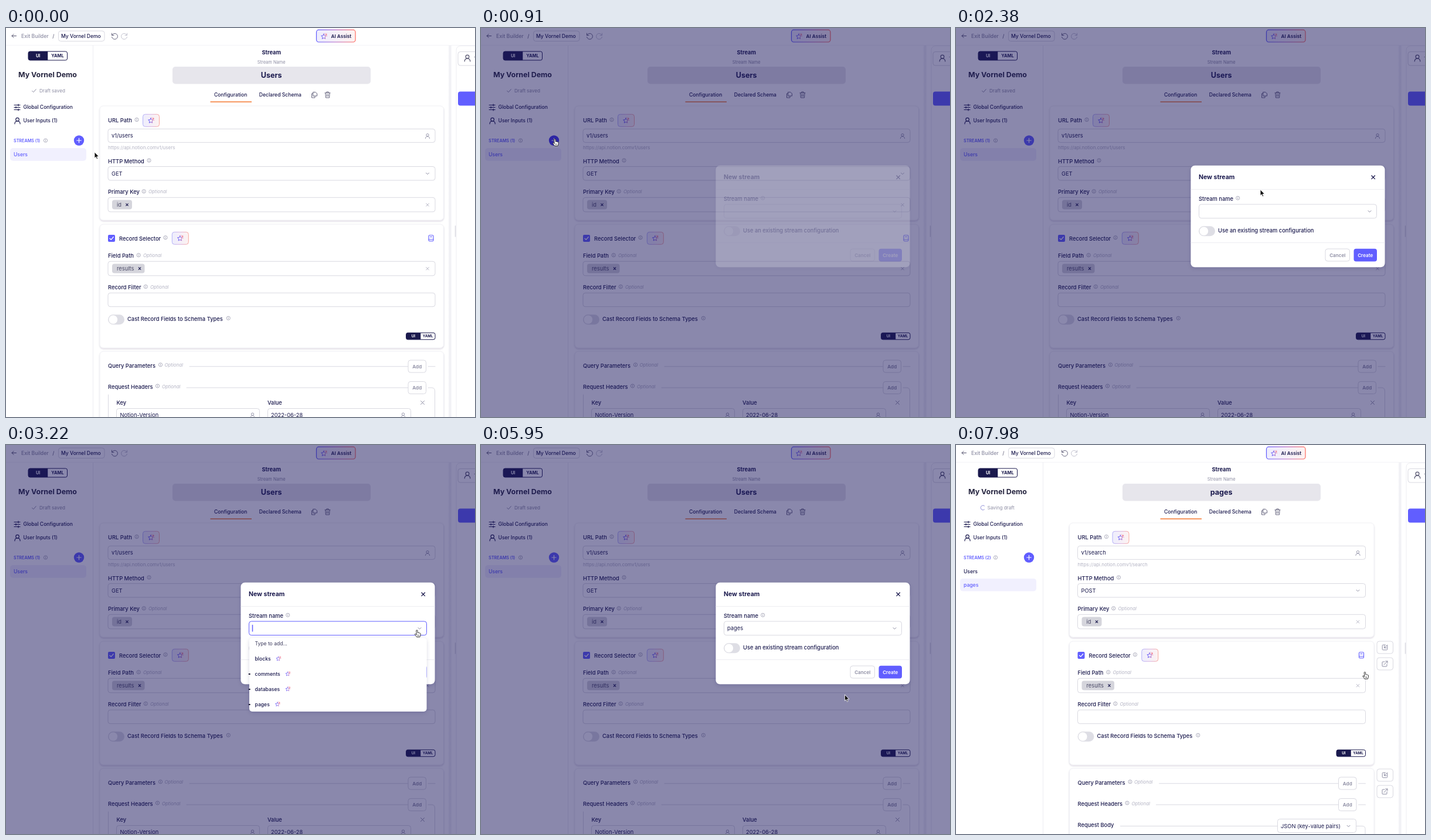
Animation of 800 by 664 pixels, one loop 8000 ms. Source, as an HTML page:

```html
<!DOCTYPE html>
<html lang="en">
<head>
<meta charset="utf-8">
<title>New stream dialog</title>
<style>
  html, body { margin: 0; width: 100%; height: 100%; overflow: hidden; background: #fff; }
  svg { display: block; width: 100vw; height: 100vh; font-family: Inter, sans-serif; }
  text { white-space: pre; }
</style>
</head>
<body>
<svg id="stage" viewBox="0 0 800 664" preserveAspectRatio="xMinYMin meet"></svg>
<script>
const INK = '#1a194d', DARK = '#25243f', GREY = '#8d8da3', PALE = '#b4b4c4';
const EDGE = '#d9d9e1', VIOLET = '#615eff', DEEP = '#4035f0', FAINT = '#ededf2';

// Drawing helpers; text is placed by the middle of its capitals.
const text = (x, y, s, size = 9.3, fill = INK, weight = 400, more = '') =>
  `<text x="${x}" y="${y + size * .364}" font-size="${size}" fill="${fill}" font-weight="${weight}" ${more}>${s}</text>`;
const mid = 'text-anchor="middle"';
const box = (x, y, w, h, r = 4, fill = '#fff', stroke = EDGE, more = '') =>
  `<rect x="${x}" y="${y}" width="${w}" height="${h}" rx="${r}" fill="${fill}" stroke="${stroke}" ${more}/>`;
const path = (d, stroke = GREY, width = 1, fill = 'none') =>
  `<path d="${d}" fill="${fill}" stroke="${stroke}" stroke-width="${width}" stroke-linecap="round" stroke-linejoin="round"/>`;
const at = (x, y, s) => `<g transform="translate(${x} ${y})">${s}</g>`;
const group = (id, s) => `<g id="${id}">${s}</g>`;

const label = (x, y, s) => text(x, y, s, 9.33, INK, 500);
const info = (x, y) => at(x, y,
  `<circle r="3.1" fill="none" stroke="${GREY}" stroke-width=".7"/>` + path('M0-.3V1.4M0-1.5v.1', GREY, .7));
const optional = (x, y) => text(x, y, 'Optional', 7.9, PALE, 400, 'font-style="italic"');
const cross = (x, y, r = 2.3, c = GREY, w = 1) => path(`M${x - r} ${y - r}l${2 * r} ${2 * r}m0 ${-2 * r}l${-2 * r} ${2 * r}`, c, w);
const chevron = (x, y) => path(`M${x - 2.5} ${y - 1.2}l2.5 2.5l2.5-2.5`);
const person = (x, y, k = 1, c = GREY) => at(x, y,
  path(`M${-4 * k} ${4.5 * k}c0-${5.4 * k} ${8 * k}-${5.4 * k} ${8 * k} 0`, c, k) +
  `<circle cy="${-2 * k}" r="${2.4 * k}" fill="none" stroke="${c}" stroke-width="${k}"/>`);

const starPath = 'M' + Array.from({ length: 10 }, (_, i) => {
  const r = i % 2 ? 2.2 : 4.6, a = i * Math.PI / 5 - Math.PI / 2;
  return `${(r * Math.cos(a)).toFixed(2)} ${(r * Math.sin(a)).toFixed(2)}`;
}).join('L') + 'Z';
const star = (x, y, k = 1) => at(x, y, `<g transform="scale(${k})">` + path(starPath, 'url(#cool)') +
  path('M4.2-4.9v2.4M3-3.7h2.4M5.7-1v.1M1.8-5.3v.1', '#f0667a', .8) + '</g>');
const aiButton = (x, y) => box(x, y, 28, 21, 4, 'url(#tint)', 'url(#blush)') + star(x + 13.5, y + 11);

const button = (x, y, w, s) => box(x, y, w, 21, 4) + text(x + w / 2, y + 10.7, s, 8.1, GREY, 600, mid);
const toggle = (x, y) => box(x, y, 28, 17, 8.5, '#dedee5', 'none') +
  `<circle cx="${x + 8.8}" cy="${y + 8.5}" r="7.8" fill="#fff" stroke="#d3d3dc" stroke-width=".6"/>`;
const modes = (x, y, w, h, size) => box(x, y, w, h, 3, '#fff', INK) +
  `<path d="M${x + w / 2} ${y}h${3 - w / 2}q-3 0-3 3v${h - 6}q0 3 3 3h${w / 2 - 3}z" fill="${INK}"/>` +
  text(x + w / 4, y + h / 2, 'UI', size, '#fff', 700, mid) +
  text(x + w * .75, y + h / 2, 'YAML', size, INK, 700, mid);
const chip = (x, y, w, s) => box(x, y, w, 16, 4, '#d5d5dc', 'none') +
  text(x + 8, y + 8, s, 9.3, '#4a4966') + cross(x + w - 8.5, y + 8, 1.8, INK, 1.1);
const card = (x, y, w, h) => box(x, y, w, h, 6, '#fff', '#f0f0f5', 'filter="url(#soft)"');

function form(L, R, path_, method) {
  const w = R - L;
  const line = (a, b, y) => path(`M${a} ${y}H${b}`, EDGE);
  return [
    card(L - 14, 133, w + 28.5, 195), card(L - 14, 335, w + 28.5, 211), card(L - 14, 552, w + 28.5, 140),
    label(L, 158, 'URL Path'), info(L + 49, 156.5), aiButton(L + 59.5, 147.3),
    box(L, 172.3, w, 23), text(L + 6, 184, path_), person(R - 13, 184.5, .9),
    text(L, 204, 'https://api.notion.com' + path_, 8, PALE),
    label(L, 227.5, 'HTTP Method'), info(L + 70, 226),
    box(L, 236.5, w, 23.5), text(L + 6, 248.3, method), chevron(R - 13, 248.5),
    label(L, 280, 'Primary Key'), info(L + 61.2, 278.8), optional(L + 69, 279.6),
    box(L, 289.3, w, 24.5), chip(L + 7, 293.6, 34, 'id'), cross(R - 13, 301.8, 2.3, PALE),

    box(L, 353, 12, 12, 2, VIOLET, 'none'), path(`M${L + 3} 359.2l2.2 2.2l4-4.6`, '#fff', 1.3),
    label(L + 19, 359.2, 'Record Selector'), info(L + 98, 357.7), aiButton(L + 109.3, 348.3),
    at(R - 7, 358.7, box(-4, -5, 8, 10, 1.5, 'none', VIOLET, 'stroke-width="1.1"') + path('M-4 2.2h8M-1.5-2.2h3', VIOLET)),
    label(L, 389, 'Field Path'), info(L + 52.2, 387.7), optional(L + 60, 388.6),
    box(L, 398.3, w, 24.5), chip(L + 7, 402.5, 55.5, 'results'), cross(R - 13, 410.7, 2.3, PALE),
    label(L, 443, 'Record Filter'), info(L + 64.3, 441.5), optional(L + 72, 442.4),
    box(L, 452.2, w, 23.5),
    toggle(L, 489.2), label(L + 33, 497, 'Cast Record Fields to Schema Types'), info(L + 205.3, 495.3),
    modes(R - 49.5, 520.3, 49.5, 11.5, 6.1),

    label(L, 576.2, 'Query Parameters'), info(L + 89.5, 574.8), optional(L + 96.5, 575.6),
    line(L + 139, R - 46, 577.8), line(R - 12, R, 577.8), button(R - 46, 567, 30.5, 'Add'),
    label(L, 612.6, 'Request Headers'), info(L + 84.5, 611), optional(L + 92, 611.9),
    line(L + 134, R - 46, 614), button(R - 46, 603.5, 30.5, 'Add')
  ].join('');
}

const headers = () => path('M720 614h6q5.5 0 5.5 6v50M174.5 670v-44', EDGE) +
  label(188.5, 640, 'Key') + label(446, 640, 'Value') + cross(710.5, 639.5, 3) +
  box(188.5, 649.5, 244, 24) + text(194.5, 661, 'Notion-Version') + person(420.5, 661, .9) +
  box(446.5, 649.5, 244, 24) + text(452, 661, '2022-06-28') + person(677.5, 661, .9);

const importIcon = path('M1-4.3h-4q-1.3 0-1.3 1.3v6q0 1.3 1.3 1.3h6q1.3 0 1.3-1.3v-6M4.3-4.3l-5 5M-.8-2.7v3.5h3.5', GREY);
const exportIcon = path('M-.5-3.5h-3q-1 0-1 1v6q0 1 1 1h6q1 0 1-1v-3M-1.5 1.5l6-6M1.2-4.5h3.3v3.3', GREY);
const sideButton = (y, icon) => box(718, y, 27.5, 21, 4) + at(731.5, y + 10.5, icon);

const body = () => label(207.5, 649, 'Request Body') +
  path('M686.5 614h12M280.5 650.5H548M683 650.5h10q5 0 5 5v12', EDGE) +
  box(548.5, 638.5, 134, 23) + text(554, 650.2, 'JSON (key-value pairs)') + chevron(669.5, 650.5) +
  [335, 553].map(y => sideButton(y, importIcon) + sideButton(y + 28, exportIcon)).join('');

const shell = () => [
  path('M0 29.5H800', '#f3f3f7'), path('M148.5 30V664', FAINT),
  `<rect x="754" y="30" width="6" height="634" fill="url(#gutter)"/>`,
  path('M800 30.5H776q-8 0-8 8V664', FAINT), path('M766.5 338v18', EDGE, 1.5),
  path('M17.5 13.5h-7.5m3-3l-3 3l3 3', '#55546f'), text(26, 13.8, 'Exit Builder', 8.7, GREY, 500),
  text(79.3, 13.8, '/', 8.7, '#55546f'), box(89.5, 5, 78.5, 17.5), text(94, 13.9, 'My Vornel Demo', 8.55, INK, 500),
  path('M180.5 9v3.5h3.5M180.8 12.3a5 5 0 1 1-.3 3', '#66657e'),
  path('M206.5 9v3.5h-3.5M206.2 12.3a5 5 0 1 0 .3 3', '#c3c3d0'),
  box(529.5, 3.2, 66.5, 20.8, 4, 'url(#tint)', 'url(#warm)', 'stroke-width="1.2"'), star(542, 14.7), text(554.5, 13.7, 'AI Assist', 8.2, INK, 600),
  modes(38, 40, 66.5, 15, 7.4), text(71, 79.2, 'My Vornel Demo', 12.4, DARK, 700, mid),
  path('M14 131.5h10M14 135.5h10M14 139.5h10M21 130v3M17 134v3M21 138v3', INK, 1.2), text(29.5, 135.3, 'Global Configuration', 8.55, INK, 500),
  person(19.5, 158.5, 1.15, INK), text(29.5, 158.2, 'User Inputs (1)', 8.45, INK, 500),
  info(67.5, 192), `<circle id="plus" cx="124.5" cy="192" r="8.7" fill="${VIOLET}"/>`, path('M120.8 192h7.4m-3.7-3.7v7.4', '#fff', 1.2),
  text(452.7, 41.3, 'Stream', 9.3, INK, 700, mid), text(452.7, 58, 'Stream Name', 7.45, GREY, 400, mid),
  box(284, 66, 338, 29.5, 5, '#e7e6ec', 'none'),
  text(355, 113.6, 'Configuration', 8.65, INK, 500), text(431.7, 113.6, 'Declared Schema', 8.6, INK, 500),
  `<rect x="348.5" y="125.3" width="70.5" height="1.6" fill="#f5803e"/>`,
  at(526, 114.3, path('M-2-4.8h4l2.5 2.5v4h-6.5zM-2-2.3h-2.5v7h5.5v-2.5', '#66657e')),
  at(548.5, 114, path('M-4.5-3.2h9M-1.7-3.5v-1.5h3.4v1.5M-3.6-3l.5 8h6.2l.5-8M-1.2-.8v3.5M1.2-.8v3.5', '#66657e')),
  box(771, 40.5, 60, 23.5, 4), person(787, 51.5, 1.2, '#55546f'), path('M799 49.5h2', GREY),
  box(771, 108.5, 60, 24, 4, VIOLET, 'none')
].join('');

const row = (y, s, on) => (on ? box(7, y - 10.7, 130, 21.7, 5, '#f1f0fe', 'none') : '') +
  text(13, y, s, 8.6, on ? VIOLET : INK, 500);
const stream = (n, title) => text(13, 192.3, `STREAMS (${n})`, 7.2, VIOLET, 600) +
  text(452.7, 80.6, title, 12.6, INK, 700, mid);

const users = stream(1, 'Users') + row(215.7, 'Users', true) + form(174, 732, 'v1/users', 'GET') + headers();
const pages = stream(2, 'pages') + row(215.7, 'Users') + row(238.6, 'pages', true) +
  form(207.5, 698.5, 'v1/search', 'POST') + body();
const saved = path('M44.5 107.3l2.3 2.3l4.4-5', GREY) + text(57, 107, 'Draft saved', 8.1, GREY);
const saving = group('spinner', path('M2.4-2.8A3.7 3.7 0 1 0 2.4 2.8', '#a9a8e0', 1.1)) +
  text(53.5, 107, 'Saving draft', 8.1, GREY);

const options = ['blocks', 'comments', 'databases', 'pages'];
const starX = [464.5, 480.5, 480.5, 463];
const menu = box(415, 329.5, 302.5, 125.5, 5, '#fff', 'none', 'filter="url(#drop)"') +
  text(424.5, 339.3, 'Type to add...', 8.55, '#3b3a5c') +
  options.map((s, i) => text(424.5, 365 + i * 25.9, s, 8.6, INK, 500) + star(starX[i], 365 + i * 25.9, .8)).join('') +
  group('ticks', path('M414.5 391h1.5m-1.5 26h1.5m-1.5 26h1.5', '#15142e', 1.8));

const modal = box(400.5, 234.8, 331, 173.5, 7, '#fff', 'none', 'filter="url(#drop)"') +
  text(414, 254.5, 'New stream', 10.5, INK, 700) + cross(711.7, 254.8, 2.8, INK, 1.3) +
  path('M401 275.5h330M401 366.5h330', FAINT) +
  label(414, 292, 'Stream name') + info(480.7, 290.3) +
  box(414.5, 301, 303, 23.7, 4, '#fff', EDGE, 'id="field"') + chevron(705.5, 313) +
  group('value', text(420, 313, 'pages')) + group('caret', path('M420.5 307.5v10.5', VIOLET, 1.5)) +
  toggle(414, 338.3) + label(447, 345.8, 'Use an existing stream configuration') +
  button(630, 377, 41.5, 'Cancel') + box(678.5, 376.7, 39.5, 21.7, 4, VIOLET, 'none', 'id="create"') +
  text(698.2, 387.7, 'Create', 8.1, '#fff', 600, mid) + group('menu', menu);

const arrow = path('M0 0v10.2l2.3-2.1l1.6 3.7l1.7-.7l-1.6-3.6h3.2z', '#fff', .8, '#111');
const hand = path('M-1 .3q1-1 2 .2l.3 4q.9-.7 1.7.2q1-.5 1.7.4q1.3-.2 1.4 1.2l-.2 2.7l-1 2.8h-5.2l-3.2-4.2q-.5-1.4 1-1.2l1.5 1.3z', '#222', .9, '#fff') +
  path('M1.3 8v2.2M3 8v2.2', '#222', .6);

const fade = (id, ...colors) => `<linearGradient id="${id}">` +
  colors.map((c, i) => `<stop offset="${i / (colors.length - 1)}" stop-color="${c}"/>`).join('') + '</linearGradient>';
const shadow = (id, dy, blur, alpha) => `<filter id="${id}" x="-10%" y="-10%" width="120%" height="125%">
  <feDropShadow dx="0" dy="${dy}" stdDeviation="${blur}" flood-color="${INK}" flood-opacity="${alpha}"/></filter>`;
const defs = '<defs>' + fade('warm', '#5f5bff', '#b263c4', '#ff6a5c') + fade('cool', '#5f5bff', '#7f66ea', '#d977a8') +
  fade('blush', '#b3b0f8', '#d9b3e0', '#f8a79f') + fade('tint', '#eeedfd', '#f5eff8', '#fdf2f1') +
  fade('gutter', '#fff', '#eeeef3', '#f7f7fa') +
  shadow('soft', 1.5, 1.3, .17) + shadow('drop', 2, 3, .16) + '</defs>';

const stage = document.getElementById('stage');
stage.innerHTML = defs + '<rect width="800" height="664" fill="#fff"/>' + shell() +
  group('users', users) + group('pages', pages) + group('saved', saved) + group('saving', saving) +
  '<rect id="veil" width="800" height="664" fill="#1b165c" opacity=".51"/>' +
  group('modal', modal) + group('arrow', arrow) + group('hand', hand);

const $ = id => document.getElementById(id);
const show = (id, on) => $(id).setAttribute('display', on ? 'inline' : 'none');
const set = (id, name, v) => $(id).setAttribute(name, v);
const ramp = (t, a, b) => Math.min(1, Math.max(0, (t - a) / (b - a)));
const ease = p => p * p * (3 - 2 * p);

const LOOP = 8000, STEP = 70;
const DIM = 910, OPEN = 3080, PICK = 5390, SWITCH = 7210, SAVE = 7560;
// Pointer moves: start, end, target x, target y.
const moves = [[0, 560, 126, 189.5], [1680, 2800, 701, 316], [3570, 4690, 593.5, 440], [5600, 6650, 697.5, 387.5]];

function pointer(t) {
  let x = 151, y = 212;
  for (const [a, b, tx, ty] of moves) {
    const p = ease(ramp(t, a, b));
    x += (tx - x) * p;
    y += (ty - y) * p;
  }
  return [x, y];
}

function draw(now) {
  const t = Math.floor(now % LOOP / STEP) * STEP;
  const [x, y] = pointer(t);
  const open = t >= OPEN && t < PICK;
  const overCreate = t > PICK && x > 678 && y > 376;
  const overPlus = Math.hypot(x - 124.5, y - 192) < 9;
  const overField = t > DIM && t < OPEN && x > 414 && y > 300;
  const isHand = overPlus || overField || open || overCreate;
  const dimmed = t >= DIM && t < SWITCH;

  show('users', t < SWITCH);
  show('pages', t >= SWITCH);
  show('saved', t < SAVE);
  show('saving', t >= SAVE);
  set('spinner', 'transform', `translate(46 107) rotate(${(t - 7980) * .45})`);

  show('veil', dimmed);
  show('modal', dimmed);
  set('modal', 'opacity', ramp(t, DIM - 40, DIM + 160));

  set('field', 'stroke', open ? VIOLET : EDGE);
  show('menu', open);
  show('ticks', t < OPEN + 280);
  show('caret', open && (t - OPEN) % 1000 < 490);
  show('value', t >= PICK);
  set('plus', 'fill', overPlus ? DEEP : VIOLET);
  set('create', 'fill', overCreate ? DEEP : VIOLET);

  show('hand', isHand);
  show('arrow', !isHand);
  set(isHand ? 'hand' : 'arrow', 'transform', `translate(${x} ${y})`);
}

let start;
function tick(now) {
  start ??= now;
  draw(now - start);
  requestAnimationFrame(tick);
}
draw(0);
requestAnimationFrame(tick);
</script>
</body>
</html>
```
